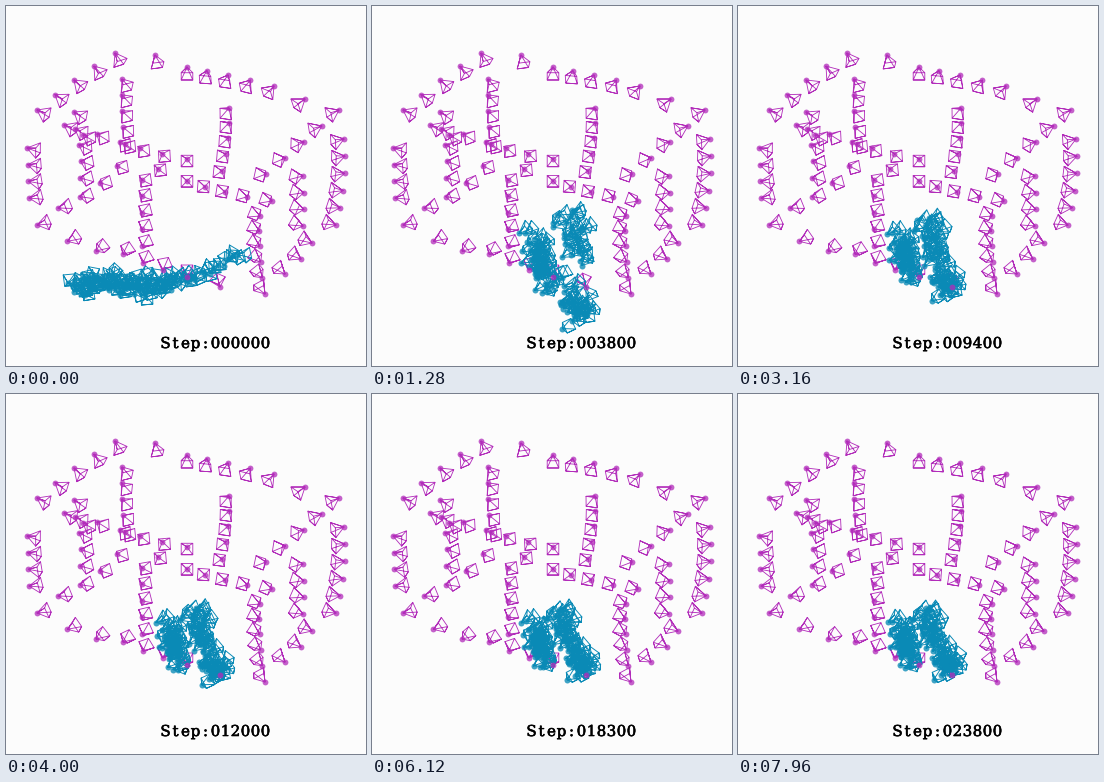
Recreate the animation shown at these times as a matplotlib script. Size 360 by 360 pixels, loop 8 s.

```python
import numpy as np
import matplotlib.pyplot as plt
from matplotlib.animation import FuncAnimation
from matplotlib.collections import LineCollection
from matplotlib.patheffects import withStroke

SIZE, FRAMES, INTERVAL = 360, 200, 40
MAGENTA, BLUE = "#b22cba", "#0a8ab6"
CENTRE = np.array([181, 178])

# Camera tracks: first, middle and last point, number of cameras
TRACKS = [
    ((109, 47), (68, 74), (31, 104), 5),
    ((181, 61), (222, 69), (268, 80), 5),
    ((333, 104), (298, 136), (260, 168), 5),
    ((21, 142), (22, 167), (23, 192), 4),
    ((31, 219), (76, 241), (117, 248), 4),
    ((69, 123), (74, 147), (74, 172), 4),
    ((58, 119), (77, 129), (91, 128), 3),
    ((52, 202), (84, 184), (111, 160), 4),
    ((116, 73), (116, 105), (119, 138), 5),
    ((114, 136), (145, 145), (181, 153), 4),
    ((181, 175), (219, 186), (266, 195), 5),
    ((136, 174), (136, 215), (137, 257), 6),
    ((223, 102), (222, 132), (216, 165), 5),
    ((254, 210), (254, 248), (259, 288), 6),
    ((338, 133), (338, 176), (330, 219), 6),
    ((297, 170), (298, 195), (297, 220), 4),
    ((306, 237), (295, 253), (279, 268), 3),
    ((157, 264), (181, 271), (214, 281), 3),
]
SINGLES = [(149, 49), (299, 93), (68, 106), (152, 163)]

# Moving groups: count, first centre, final centre, spread
GROUPS = [
    (40, (163, 257), (162, 251), (5, 12)),
    (26, (198, 232), (187, 235), (6, 12)),
    (30, (200, 297), (204, 266), (7, 10)),
]


def unit(v):
    return v / np.linalg.norm(v, axis=1, keepdims=True)


def wires(apex, view, depth=12.0, half=5.8):
    """Wireframe pyramids: one path per camera through apex and base."""
    length = np.hypot(*view.T) + 1e-6
    view = view * np.minimum(1, 0.94 * depth / length)[:, None]
    dz = np.sqrt(depth ** 2 - (view ** 2).sum(1))
    fwd = np.column_stack([view, dz]) / depth
    right = unit(np.cross(fwd, [0, -0.87, 0.5]))
    up = np.cross(right, fwd)
    u, v = right[:, :2] * half, up[:, :2] * half
    mid = apex + view
    a, b, c, d = mid - u - v, mid + u - v, mid + u + v, mid - u + v
    return np.stack([apex, a, b, apex, c, d, apex, d, a, b, c], axis=1)


def track(first, middle, last, count):
    """Evenly timed points on the quadratic through three points."""
    t = np.linspace(0, 1, count)[:, None]
    p, q, r = map(np.array, (first, middle, last))
    return (1 - t) * (1 - 2 * t) * p + 4 * t * (1 - t) * q + t * (2 * t - 1) * r


rng = np.random.default_rng(12)
counts = [g[0] for g in GROUPS]
total = sum(counts)
begin, end, spread = (np.repeat(np.array([g[i] for g in GROUPS], float), counts, axis=0)
                      for i in (1, 2, 3))
offset = np.clip(rng.normal(0, 1, (total, 2)), -1.9, 1.9) * spread
offset[:, 0] += 0.2 * offset[:, 1]
wild = np.clip(rng.normal(0, 1, (total, 2)), -1.8, 1.8) * [24, 34]
phase = rng.uniform(0, 2 * np.pi, (total, 4))
rate = rng.uniform(0.15, 1.1, (total, 4))

# Starting band: a dense bar on the left, a sparse tail rising to the right
along = np.linspace(0, 1, total)
tail = np.clip((along - 0.82) / 0.18, 0, 1)
start = np.column_stack([
    68 + 97 * np.minimum(along / 0.82, 1) + 67 * tail,
    281 - 4 * along - 29 * tail ** 1.5,
]) + rng.normal(0, 1, (total, 2)) * [3, 4.5] * (1 - 0.8 * tail)[:, None]
rng.shuffle(start)
start_view = rng.normal((4, -3), 4, (total, 2))
end_view = rng.normal((9, -4), 3, (total, 2))


def moving_cameras(n):
    t = min(n / 18, 1)
    ease = t * t * (3 - 2 * t)
    burst = np.sin(np.pi * min(n / 20, 1) ** 0.7)
    fade = np.exp(-max(n - 32, 0) / 35)
    sway = (np.sin(rate * n + phase) - np.sin(phase)) * (0.5 + 1.3 * np.exp(-n / 60))
    goal = end + (begin - end) * fade + offset * (1 + 0.3 * fade)
    pos = start * (1 - ease) + goal * ease + wild * burst + sway[:, :2]
    view = start_view * (1 - ease) + end_view * ease + sway[:, 2:]
    return pos, view


fig = plt.figure(figsize=(5, 5), dpi=72, facecolor="#fcfcfc")
ax = fig.add_axes([0, 0, 1, 1])
ax.set_xlim(0, SIZE)
ax.set_ylim(SIZE, 0)
ax.axis("off")

# Fixed cameras all look towards the middle of the ring
spots = np.concatenate([track(*args) for args in TRACKS] + [np.array(SINGLES)])
ax.add_collection(LineCollection(wires(spots, (CENTRE - spots) * 0.08),
                                 colors=MAGENTA, linewidths=0.85, zorder=1))
ax.scatter(*spots.T, s=34, color=MAGENTA, alpha=0.75, linewidths=0, zorder=4)

lines = LineCollection([], colors=BLUE, linewidths=0.95, zorder=2)
ax.add_collection(lines)
dots = ax.scatter(*start.T, s=36, color=BLUE, alpha=0.78, linewidths=0, zorder=3)

# Evenly pitched caption, one glyph per 10 px cell
bold = [withStroke(linewidth=0.6, foreground="black")]
glyphs = [ax.text(159.5 + 10 * i, 342, ch, family="DejaVu Serif", size=15,
                  color="black", ha="center", va="baseline", zorder=5,
                  path_effects=bold)
          for i, ch in enumerate("Step:000000")]


def draw(n):
    pos, view = moving_cameras(n)
    lines.set_segments(wires(pos, view))
    dots.set_offsets(pos)
    step = n * 6 // 5 * 100
    for glyph, ch in zip(glyphs[5:], f"{step:06d}"):
        glyph.set_text(ch)
    return [lines, dots, *glyphs]


anim = FuncAnimation(fig, draw, frames=FRAMES, interval=INTERVAL,
                     repeat=True, repeat_delay=0, blit=False)
plt.show()
```
